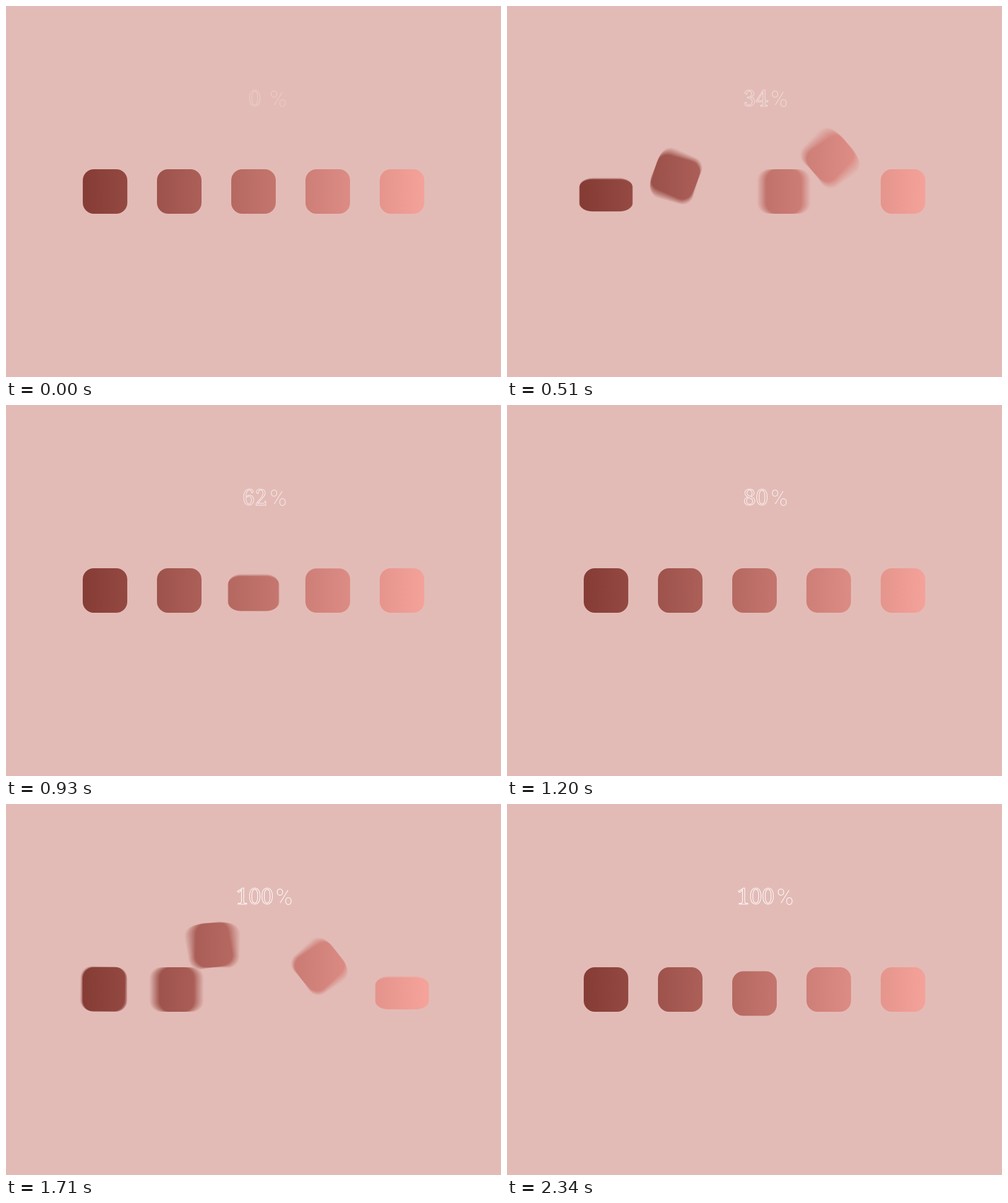
These frames come from a looping animation (800 px wide and 600 px high, 2370 ms). An HTML page without scripts:

```html
<!DOCTYPE html>
<html lang="en">
<head>
<meta charset="utf-8">
<title>Loading</title>
<style>
@property --n { syntax: "<integer>"; inherits: false; initial-value: 0; }
html, body { margin: 0; width: 100%; height: 100%; overflow: hidden; background: #e3bbb6; }
svg { position: absolute; left: 0; top: 0; }

/* Each mask layer runs slightly ahead of the last; together they average to motion blur. */
.layer { opacity: calc(1 / (1 + var(--i))); }
rect { x: -36px; y: -36px; width: 72px; height: 72px; rx: 18px; fill: #fff;
  animation: 2370ms cubic-bezier(.333, 0, .667, 1) calc(var(--i) * -2.5ms) infinite; }
.a { animation-name: slide; }
.b { translate: 220px 300px; animation-name: spin-b, pop-b; }
.c { translate: 340px 300px; animation-name: spin-c, pop-c; }
.d { translate: 460px 300px; animation-name: spin-d, pop-d; }
.e { translate: 580px 300px; animation-name: spin-e, pop-e; }

@keyframes slide {
  0%, .2%, 82.57%, 100% { transform: translate(160px, 300px); }
  38.57%, 51.27% { transform: translate(640px, 300px); }
}

/* Swing around the point between two slots */
@keyframes spin-b { 0%, .59%, 90.25%, 100% { rotate: 0deg; } 16.84%, 72.11% { rotate: -180deg; } }
@keyframes spin-c { 0%, 8.78%, 81.81%, 100% { rotate: 0deg; } 25.32%, 63.88% { rotate: -180deg; } }
@keyframes spin-d { 0%, 16.84%, 78.35%, 100% { rotate: 0deg; } 33.38%, 58.9% { rotate: -180deg; } }
@keyframes spin-e { 0%, 22.87%, 66.41%, 100% { rotate: 0deg; } 39.41%, 51.01% { rotate: -180deg; } }

/* Swing radius, then the squash on landing */
@keyframes pop-b {
  0%, .59%, 15.57%, 16.84%, 25.7%, 72.11%, 87.3%, 90.25%, 98.69%, 100% { transform: translate(60px, 0) scale(1, 1); }
  8.82% { transform: translate(80px, 0) scale(1, 1); }
  13.42% { transform: translate(72px, 0) scale(1, 1); }
  20.93% { transform: translate(60px, -6.5px) scale(1.22, .7); }
  75.74%, 81.18% { transform: translate(90px, 0) scale(1, 1); }
  94.05% { transform: translate(60px, 6.5px) scale(1.22, .7); }
}
@keyframes pop-c {
  0%, 8.78%, 24.22%, 25.32%, 34.56%, 63.88%, 76.33%, 81.81% { transform: translate(60px, 0) scale(1, 1); }
  13.88% { transform: translate(83px, 0) scale(1, 1); }
  16.84% { transform: translate(80px, 0) scale(1, 1); }
  21.9%, 72.53% { transform: translate(72px, 0) scale(1, 1); }
  29.79% { transform: translate(60px, -6.5px) scale(1.22, .7); }
  67.47% { transform: translate(88px, 0) scale(1, 1); }
  86.03% { transform: translate(60px, 6.5px) scale(1.22, .7); }
  90.68%, 100% { transform: translate(60px, 6.5px) scale(1, 1); }
}
@keyframes pop-d {
  0%, 16.84%, 30.55%, 33.38%, 42.57%, 61.14%, 71.69%, 78.35%, 87.3%, 100% { transform: translate(60px, 0) scale(1, 1); }
  21.9% { transform: translate(83px, 0) scale(1, 1); }
  25.06%, 64.09% { transform: translate(80px, 0) scale(1, 1); }
  37.72% { transform: translate(60px, -6.5px) scale(1.22, .7); }
  82.66% { transform: translate(60px, 6.5px) scale(1.22, .7); }
}
@keyframes pop-e {
  0%, 25.7%, 38.35%, 39.41%, 48.48%, 51.01%, 66.41%, 67.47%, 76.33%, 100% { transform: translate(60px, 0) scale(1, 1); }
  30.76% { transform: translate(79px, 0) scale(1, 1); }
  36.03% { transform: translate(72px, 0) scale(1, 1); }
  43.76% { transform: translate(60px, -6.5px) scale(1.22, .7); }
  56.08% { transform: translate(75px, 0) scale(1, 1); }
  61.14% { transform: translate(62px, 0) scale(1, 1); }
  71.69% { transform: translate(60px, 6.5px) scale(1.22, .7); }
}

.label { animation: fade 2370ms linear infinite; }
.label div { position: absolute; width: 200px; line-height: 0; text-align: center; white-space: nowrap; }
.number { left: 302px; top: 149px; font-family: "Noto Serif", serif; font-size: 36px;
  color: transparent; -webkit-text-stroke: 1px #fff;
  counter-reset: n var(--n); animation: count 2370ms steps(50) -5ms infinite; }
.number::before { content: counter(n); }
.sign { left: 340px; top: 151px; font: 100 37px/0 Roboto, sans-serif; color: #fff;
  animation: shift 2370ms step-end -5ms infinite; }
@keyframes count { 0% { --n: 0; } 63.29%, 100% { --n: 100; } }
@keyframes shift { 0% { translate: 0; } 63.29%, 100% { translate: 9.5px; } }
@keyframes fade { 0% { opacity: .3; } 63.29%, 100% { opacity: 1; } }
</style>
</head>
<body>
<svg width="800" height="600" viewBox="0 0 800 600">
  <defs>
    <linearGradient id="tone" gradientUnits="userSpaceOnUse" x1="124" y1="0" x2="676" y2="0">
      <stop offset="0" stop-color="#853c35"/>
      <stop offset="1" stop-color="#f4a29a"/>
    </linearGradient>
    <mask id="squares" maskUnits="userSpaceOnUse" x="0" y="0" width="800" height="600">
      <g class="layer" style="--i:0"><path d="M0 0h800v600H0z"/><rect class="a"/><rect class="b"/><rect class="c"/><rect class="d"/><rect class="e"/></g>
      <g class="layer" style="--i:1"><path d="M0 0h800v600H0z"/><rect class="a"/><rect class="b"/><rect class="c"/><rect class="d"/><rect class="e"/></g>
      <g class="layer" style="--i:2"><path d="M0 0h800v600H0z"/><rect class="a"/><rect class="b"/><rect class="c"/><rect class="d"/><rect class="e"/></g>
      <g class="layer" style="--i:3"><path d="M0 0h800v600H0z"/><rect class="a"/><rect class="b"/><rect class="c"/><rect class="d"/><rect class="e"/></g>
      <g class="layer" style="--i:4"><path d="M0 0h800v600H0z"/><rect class="a"/><rect class="b"/><rect class="c"/><rect class="d"/><rect class="e"/></g>
      <g class="layer" style="--i:5"><path d="M0 0h800v600H0z"/><rect class="a"/><rect class="b"/><rect class="c"/><rect class="d"/><rect class="e"/></g>
      <g class="layer" style="--i:6"><path d="M0 0h800v600H0z"/><rect class="a"/><rect class="b"/><rect class="c"/><rect class="d"/><rect class="e"/></g>
      <g class="layer" style="--i:7"><path d="M0 0h800v600H0z"/><rect class="a"/><rect class="b"/><rect class="c"/><rect class="d"/><rect class="e"/></g>
    </mask>
  </defs>
  <path d="M0 0h800v600H0z" fill="url(#tone)" mask="url(#squares)"/>
</svg>
<div class="label"><div class="number"></div><div class="sign">%</div></div>
</body>
</html>
```
